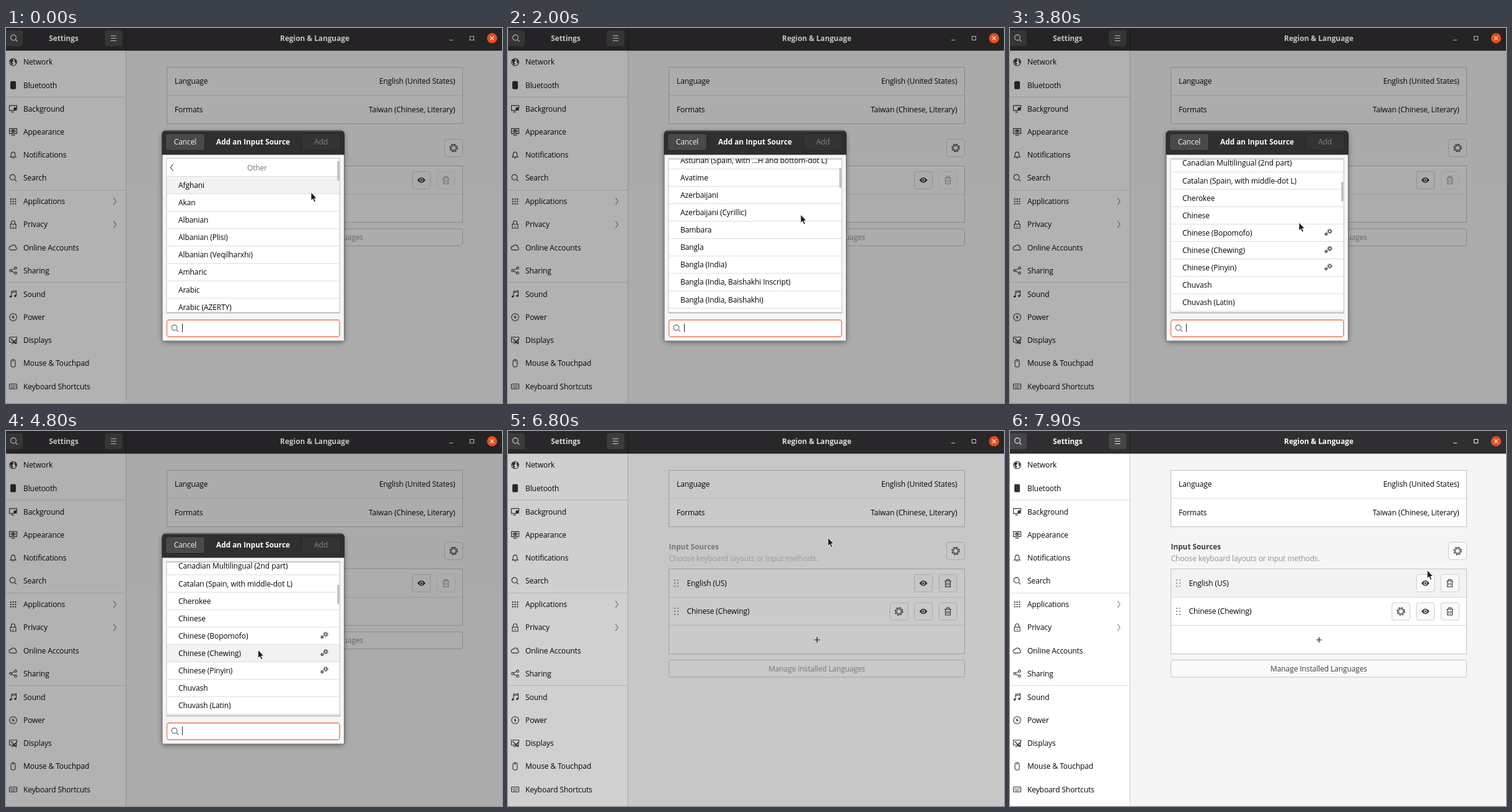
These frames come from a looping animation (800 px wide and 605 px high, 8000 ms). An HTML page:

```html
<!DOCTYPE html>
<html lang="en">
<head>
<meta charset="utf-8">
<title>Region and language settings</title>
<style>
html, body { margin: 0; width: 100%; height: 100%; overflow: hidden; background: #f6f5f6; }
svg { display: block; width: 100vw; height: 100vh; --card: #fff; --button: #fafafa; }
text { font: 500 12.05px "Open Sans", "Noto Sans", sans-serif; letter-spacing: -.12px; fill: #060606; }
text.bold { font-weight: 700; font-size: 11.8px; letter-spacing: 0; }
.icon { fill: none; stroke: #333; stroke-width: 1.1; }
.solid { fill: #333; stroke: none; }
.box { fill: var(--card); stroke: #c4c2c4; }
.button { fill: var(--button); stroke: #d0ced0; }
.wide { fill: var(--button); stroke: #c4c2c4; }
.line { stroke: #dddbdd; fill: none; }
</style>
</head>
<body>
<svg id="stage" viewBox="0 0 800 605"></svg>
<script>
const LOOP = 8000, ROW = 28.1, FIRST = 225.4, CHEWING = 91;
const ADDED = 6700, SELECTED = 5000;

const rect = (x, y, w, h, attrs = '') => `<rect x="${x}" y="${y}" width="${w}" height="${h}" ${attrs}/>`;
const path = (d, attrs = '') => `<path d="${d}" ${attrs}/>`;
const circle = (x, y, r, attrs = '') => `<circle cx="${x}" cy="${y}" r="${r}" ${attrs}/>`;
const group = (content, attrs = '') => `<g ${attrs}>${content}</g>`;
const at = (x, y, content, attrs = '') => group(content, `transform="translate(${x} ${y})" ${attrs}`);
// y is the optical middle of the capitals
const text = (x, y, s, attrs = '') =>
  `<text x="${x}" y="${y + 4.4}" ${attrs}>${s.replace(/&/g, '&amp;')}</text>`;
const centered = 'text-anchor="middle" ';

const search = circle(-1, -1, 4.4) + path('M2.3 2.3L5.5 5.5');
const monitor = path('M2 3H-6V-5H6V-1M-3 5.5H1');
const cog = circle(0, 0, 3.7, 'stroke-width=".9"') + circle(0, 0, 5.2, 'stroke-width=".9"') +
  circle(0, 0, 6.2, 'stroke-width="1.3" stroke-dasharray="2.4 2.47"');
const eye = path('M-6.5 0Q0 -8.5 6.5 0Q0 8.5 -6.5 0Z', 'class="solid"') +
  circle(0, 0, 2.7, 'fill="#fff" stroke="none"') + circle(0, 0, 1.6, 'class="solid"');
const trash = path('M-5.5 -3.5H5.5M-2 -4V-6H2V-4M-4 -3V6H4V-3M-1.6 -1V4M1.6 -1V4');
const twoGears = circle(2.2, -1.5, 2.1) + circle(2.2, -1.5, 3.5, 'stroke-dasharray="1.4 1.35"') +
  circle(-3.6, 3, 1.3) + circle(-3.6, 3, 2.2, 'stroke-dasharray=".9 .83"');

function dots(cols, rows, gap, size) {
  let out = '';
  for (let c = 0; c < cols; c++) for (let r = 0; r < rows; r++)
    out += rect((c - (cols - 1) / 2) * gap - size / 2, (r - (rows - 1) / 2) * gap - size / 2, size, size, 'class="solid"');
  return out;
}

const menu = [
  ['Network', circle(0, 0, 5.8) + path('M-5 -3L-1 -5L1 -2L-2 0L0 3L-2 5L-4 1ZM2 -5L5 -2L5 3L3 1Z', 'class="solid"')],
  ['Bluetooth', rect(-4.5, -6.5, 9, 13, 'rx="2" class="solid"')],
  ['Background', monitor + rect(1, -2, 5, 5, 'class="solid"')],
  ['Appearance', path('M-6 -5H6V3H-6ZM-3 5.5H3M-4 -1Q0 -5 4 -1Q0 3 -4 -1') + circle(0, -1, 1.4, 'class="solid"')],
  ['Notifications', path('M-4.5 3.5Q-3 2 -3 -1.5A3 3 0 0 1 3 -1.5Q3 2 4.5 3.5ZM-1 5.5H1')],
  ['Search', search],
  ['Applications', dots(3, 3, 3.8, 2)],
  ['Privacy', path('M-4.5 -.5H4.5V6H-4.5ZM-3 -.5V-3A3 3 0 0 1 3 -3V-.5M0 2V4')],
  ['Online Accounts', path('M-4 4H4A2.5 2.5 0 0 0 4.5 -.5A4 4 0 0 0 -3 -2A3 3 0 0 0 -4 4Z')],
  ['Sharing', path('M3.5 -4L-4 0L3.5 4') + circle(-4, 0, 1.8, 'fill="#fff"') + circle(4, -4, 1.8, 'fill="#fff"') + circle(4, 4, 1.8, 'fill="#fff"')],
  ['Sound', path('M-2.5 4V-4.5L5 -5.5V3M-2.5 -2.5L5 -3.5') + circle(-4, 4, 1.7, 'class="solid"') + circle(3.3, 3, 1.7, 'class="solid"')],
  ['Power', circle(0, 0, 5.8) + path('M1 -4L-2.5 .6H0L-1 4L2.5 -.6H0Z', 'class="solid"')],
  ['Displays', monitor + path('M-4 -3L5 5.5M0 3L5 -1V5.5Z', 'stroke-width="1.4"')],
  ['Mouse & Touchpad', rect(-3.5, -6, 7, 12, 'rx="3.5"') + path('M0 -6V-2')],
  ['Keyboard Shortcuts', rect(-6, -4, 12, 8, 'rx="1"') + path('M-4 -1.5H4M-4 .5H4M-2.5 2.3H2.5', 'stroke-dasharray="1.4 .8"')]
];

// "Name=a;b" lists the plain name and its variants, "Name:a;b" the variants only
const layouts = `Afghani
Akan
Albanian=Plisi;Veqilharxhi
Amharic
Arabic=AZERTY;AZERTY, Eastern Arabic numerals;Algeria;Buckwalter;Eastern Arabic numerals;Latin;Latin, phonetic;Morocco;extended;Pakistan;QWERTY;QWERTY, Eastern Arabic numerals;phonetic;Syria
Armenian=alt. extended;alt. eastern;alt. phonetic;eastern;phonetic;western
Asturian:Spain, with …H and bottom-dot L
Avatime
Azerbaijani=Cyrillic
Bambara
Bangla=India;India, Baishakhi Inscript;India, Baishakhi;India, Bornona;India, Gitanjali;India, Probhat;Probhat
Bashkirian
Belarusian=Latin;intl.;legacy
Belgian=ISO, alt.;Latin-9 only, alt.;AZERTY;AZERTY, alt.;alt.;no dead keys
Berber:Algeria, Latin;Algeria, Tifinagh;Morocco, Tifinagh alt. phonetic;Morocco, Tifinagh alt.;Morocco, Tifi… extended phonetic;Morocco, Tifinagh extended;Morocco, Tifinagh phonetic;Morocco, Tifinagh
Bosnian=US, with Bosnian digraphs;US, with Bosnian letters;with Bosnian digraphs;with guillemets
Braille:left-handed;left-handed inverted thumb;right-handed;right-handed inverted thumb
Breton:France
Bulgarian=enhanced;new phonetic;traditional phonetic
Burmese=Zawgyi
Cameroon:AZERTY, intl.;Dvorak, intl.
Cameroon Multilingual:QWERTY, intl.
Canadian:intl.;intl., 1st part;intl., 2nd part
Canadian Multilingual=1st part;2nd part
Catalan:Spain, with middle-dot L
Cherokee
Chinese=Bopomofo;Chewing;Pinyin
Chuvash=Latin`.split('\n').flatMap(entry => {
  const [, name, mark, variants] = entry.match(/^([^=:]+)([=:]?)(.*)$/);
  const full = variants ? variants.split(';').map(v => `${name} (${v})`) : [];
  return mark === ':' ? full : [name, ...full];
});

function sidebar() {
  let out = rect(0, 36, 193, 569, 'fill="#fff"') + path('M193.5 36V605', 'stroke="#d0ced0"');
  menu.forEach(([label, icon], i) => {
    const y = 55 + 37.22 * i + .7 * ((i > 1) + (i > 5) + (i > 9));
    out += at(11.5, y, icon, 'class="icon"') + text(28, y, label);
    if (label === 'Applications' || label === 'Privacy')
      out += path(`M173.5 ${y - 5.5}L177.5 ${y}L173.5 ${y + 5.5}`, 'class="icon" style="stroke:#555;stroke-width:1"');
  });
  return out + path('M0 111.5H193M0 261.5H193M0 410.5H193', 'class="line"');
}

function titleBar() {
  const white = 'style="fill:#fff" ';
  const bright = 'class="icon" style="stroke:#eee"';
  return rect(0, 0, 800, 36, 'fill="#302e30"') + path('M0 36H800', 'stroke="#1c1a1c"') +
    rect(-4, 3.5, 31, 26, 'rx="4" fill="#474547"') + at(13, 16.5, search, bright) +
    rect(159.5, 3.5, 28, 26, 'rx="4" fill="#474547"') +
    path('M169 12.5H178M169 16.5H178M169 20.5H178', bright) + path('M193.5 0V36', 'stroke="#1f1d1f"') +
    text(93, 16.5, 'Settings', centered + white + 'class="bold"') +
    text(498, 16.5, 'Region & Language', centered + white + 'class="bold"') +
    path('M715 19.5H721M748.5 13.5H754.5V19.5H748.5Z', bright);
}

// keeps its colour while the window is dimmed
const closeButton = () => circle(784, 16.5, 8.2, 'fill="#e24f23"') +
  path('M781 13.5L787 19.5M787 13.5L781 19.5', 'stroke="#f8e4dc" stroke-width="1.2"');

const iconButton = (x, y, icon, attrs = '') =>
  at(x, y, rect(-14.5, -14, 29, 28, 'rx="3.5" class="button"') + group(icon, 'class="icon"'), attrs);

function panel() {
  const sourceRow = (y, label) => at(271.5, y, dots(2, 3, 5, 2), 'opacity=".5"') +
    text(288.5, y, label) + iconButton(670, y, eye);
  return rect(194, 36, 606, 569, 'fill="#f6f5f6"') +
    rect(259.5, 63.5, 477, 91, 'class="box"') + path('M260 108.5H736', 'class="line"') +
    text(272, 86, 'Language') + text(724.5, 86, 'English (United States)', 'text-anchor="end"') +
    text(272, 131.5, 'Formats') + text(724.5, 131.5, 'Taiwan (Chinese, Literary)', 'text-anchor="end"') +
    text(259.5, 187, 'Input Sources', 'class="bold" id="heading"') +
    text(259.5, 205.5, 'Choose keyboard layouts or input methods.', 'id="hint"') +
    iconButton(722, 193.5, cog) +
    rect(259.5, 222.5, 477, 91, 'class="box" id="sources"') +
    rect(260, 223, 476, 45, 'fill="#f3f2f3" id="sourceHover"') +
    path('M260 268.5H736', 'class="line"') + sourceRow(245.5, 'English (US)') +
    iconButton(709.5, 245.5, trash, 'id="remove"') +
    group(path('M260 313.5H736', 'class="line"') + sourceRow(291, 'Chinese (Chewing)') +
      iconButton(630.5, 291, cog) + iconButton(709.5, 291, trash), 'id="chewingSource"') +
    group(path('M494 291.5H503M498.5 287V296', 'class="icon" style="stroke:#111"') +
      rect(259.5, 324, 477, 27.5, 'rx="3.5" class="wide"') +
      text(498, 338, 'Manage Installed Languages', centered + 'id="manage"'), 'id="below"');
}

function layoutList() {
  let out = path('M269.5 219.5L265.5 225L269.5 230.5', 'class="icon"') +
    text(405, FIRST, 'Other', centered + 'style="fill:#777"') +
    rect(259, 0, 280, ROW, 'fill="#f3f2f3" id="rowHover"') +
    rect(259, FIRST + ROW * (CHEWING - .5), 280, ROW, 'fill="#cd4425" id="selection"');
  layouts.forEach((label, i) => {
    const y = FIRST + ROW * (i + 1), chosen = i + 1 === CHEWING;
    out += path(`M260 ${y - ROW / 2}H538`, 'class="line"') + text(278, y, label, chosen ? 'id="chosen"' : '');
    if (/Bopomofo|Chewing|Pinyin/.test(label))
      out += at(513.5, y - 1, twoGears, `class="icon" ${chosen ? 'id="chosenGears"' : ''}`);
  });
  const end = FIRST + ROW * (layouts.length + .5);
  return out + path(`M260 ${end}H538`, 'class="line"');
}

function dialog() {
  return rect(252, 166, 293.5, 339, 'rx="6" fill="#222" filter="url(#shadow)"') +
    path('M252 505V172Q252 166 258 166H539.5Q545.5 166 545.5 172V505Z', 'fill="#f6f5f6" stroke="#6f6d6f"') +
    path('M252 204V172Q252 166 258 166H539.5Q545.5 166 545.5 172V204Z', 'fill="#302e2f" stroke="#232123"') +
    path('M257 166.5H540', 'stroke="#555254"') +
    rect(257.5, 170.5, 63, 27, 'rx="4" fill="#4b484a" stroke="#252325"') +
    text(289, 184, 'Cancel', centered + 'style="fill:#f2f2f2"') +
    text(398.5, 184, 'Add an Input Source', centered + 'class="bold" style="fill:#fff"') +
    rect(476.5, 170.5, 63, 27, 'rx="4" id="addButton"') + text(508, 184, 'Add', centered + 'id="addLabel"') +
    rect(259.5, 211, 279, 249, 'fill="#fff"') +
    group(group(layoutList(), 'id="list"'), 'clip-path="url(#viewport)"') +
    rect(260, 211, 278, 2, 'fill="#000" opacity=".13" id="topEdge"') +
    rect(534.5, 0, 3, 32, 'rx="1.5" fill="#b9b7b8" id="thumb"') +
    rect(259, 210.5, 279.5, 249.5, 'fill="none" stroke="#c6c3c5"') + path('M259 459.3H539', 'stroke="#bcb9bb" stroke-width="1.6"') +
    rect(259.5, 471, 278.5, 27, 'rx="3.5" id="entry"') +
    at(272.5, 484.5, search, 'class="icon" style="stroke:#666"') +
    path('M284.5 477V490.5', 'stroke="#222" id="caret"');
}

const stage = document.getElementById('stage');
stage.innerHTML = `<defs>
  <clipPath id="viewport">${rect(259.5, 211, 279, 248.5)}</clipPath>
  <filter id="shadow" x="-20%" y="-20%" width="140%" height="140%">
    <feDropShadow dx="0" dy="2" stdDeviation="4.5" flood-color="#000" flood-opacity=".45"/>
  </filter></defs>` +
  panel() + sidebar() + titleBar() +
  group(rect(0, 0, 800, 36, 'opacity=".75"') + rect(0, 36, 800, 569), 'id="shade"') +
  closeButton() + group(dialog(), 'id="dialog"') +
  path('M0 0V13.5L3 10.8L5.2 15.8L7.5 14.8L5.3 9.9H9.3Z', 'id="pointer" fill="#1c1a1c" stroke="#fff" stroke-width=".9"');

const node = id => document.getElementById(id);
const set = (id, attrs) => { for (const k in attrs) node(id).setAttribute(k, attrs[k]); };
const show = (id, on) => { node(id).style.display = on ? '' : 'none'; };
const fill = (id, color) => { node(id).style.fill = color; };
const smooth = k => k * k * (3 - 2 * k);
const clamp = k => Math.min(1, Math.max(0, k));
const gray = (a, b, k) => { const v = Math.round(a + (b - a) * k); return `rgb(${v},${v},${v})`; };

const pointerKeys = [[0, 492, 265], [900, 472, 301], [2000, 472, 301], [2800, 468, 312.5], [3500, 466, 313.5],
  [4000, 466, 313.5], [4700, 406.5, 353], [5900, 406.5, 353], [6400, 516, 172], [6900, 516, 172], [7900, 673, 224.5]];
const scrollKeys = [[0, 0], [1000, 0], [2000, 827], [2800, 1582.5], [3700, 2424]];

function sample(keys, t, ease = k => k) {
  const i = keys.findIndex(key => key[0] > t);
  if (i < 0) return keys[keys.length - 1].slice(1);
  const a = keys[i - 1], b = keys[i], k = ease((t - a[0]) / (b[0] - a[0]));
  return a.slice(1).map((v, j) => v + (b[j + 1] - v) * k);
}

function draw(t) {
  const [x, y] = sample(pointerKeys, t, smooth);
  const [scroll] = sample(scrollKeys, t);
  const selected = t >= SELECTED, added = t >= ADDED;
  set('pointer', { transform: `translate(${x} ${y})` });

  show('dialog', !added);
  set('list', { transform: `translate(0 ${-scroll})` });
  set('thumb', { y: 214.5 + scroll * .0137 });
  show('topEdge', scroll > 0);
  const row = Math.floor((y + scroll - FIRST) / ROW + .5);
  show('rowHover', (t <= 1000 || t > 4000) && y > 211 && y < 459 && x < 538);
  set('rowHover', { y: FIRST + ROW * (row - .5) });
  show('selection', selected);
  fill('chosen', selected ? '#fff' : '');
  node('chosenGears').style.stroke = selected ? '#f0b3a4' : '#333';
  set('addButton', { fill: selected ? '#20c22e' : '#343233', stroke: selected ? '#189c24' : '#262426' });
  fill('addLabel', selected ? '#c9f3c6' : '#858385');
  set('entry', { fill: '#fff', stroke: selected ? '#c9c6c8' : '#ec987d', 'stroke-width': selected ? 1 : 1.8 });
  show('caret', !selected);

  const wake = clamp((t - 6800) / 200);
  set('shade', { opacity: .3 * (1 - clamp((t - ADDED) / 260)) });
  stage.style.setProperty('--card', gray(248, 255, wake));
  stage.style.setProperty('--button', gray(246, 250, wake));
  fill('heading', gray(148, 61, wake));
  fill('manage', gray(148, 61, wake));
  fill('hint', gray(190, 146, wake));
  set('sources', { height: added ? 137 : 91 });
  show('chewingSource', added);
  set('remove', { opacity: added ? 1 : .45 });
  set('below', { transform: `translate(0 ${added ? 45.5 : 0})` });
  show('sourceHover', added && x > 260 && x < 736 && y > 223 && y < 313);
  set('sourceHover', { y: y >= 268 ? 269 : 223 });
}

const start = performance.now();
function tick(now) {
  const t = Math.max(0, now - start) % LOOP;
  draw(Math.floor(t / 100) * 100);
  requestAnimationFrame(tick);
}
draw(0);
requestAnimationFrame(tick);
</script>
</body>
</html>
```
